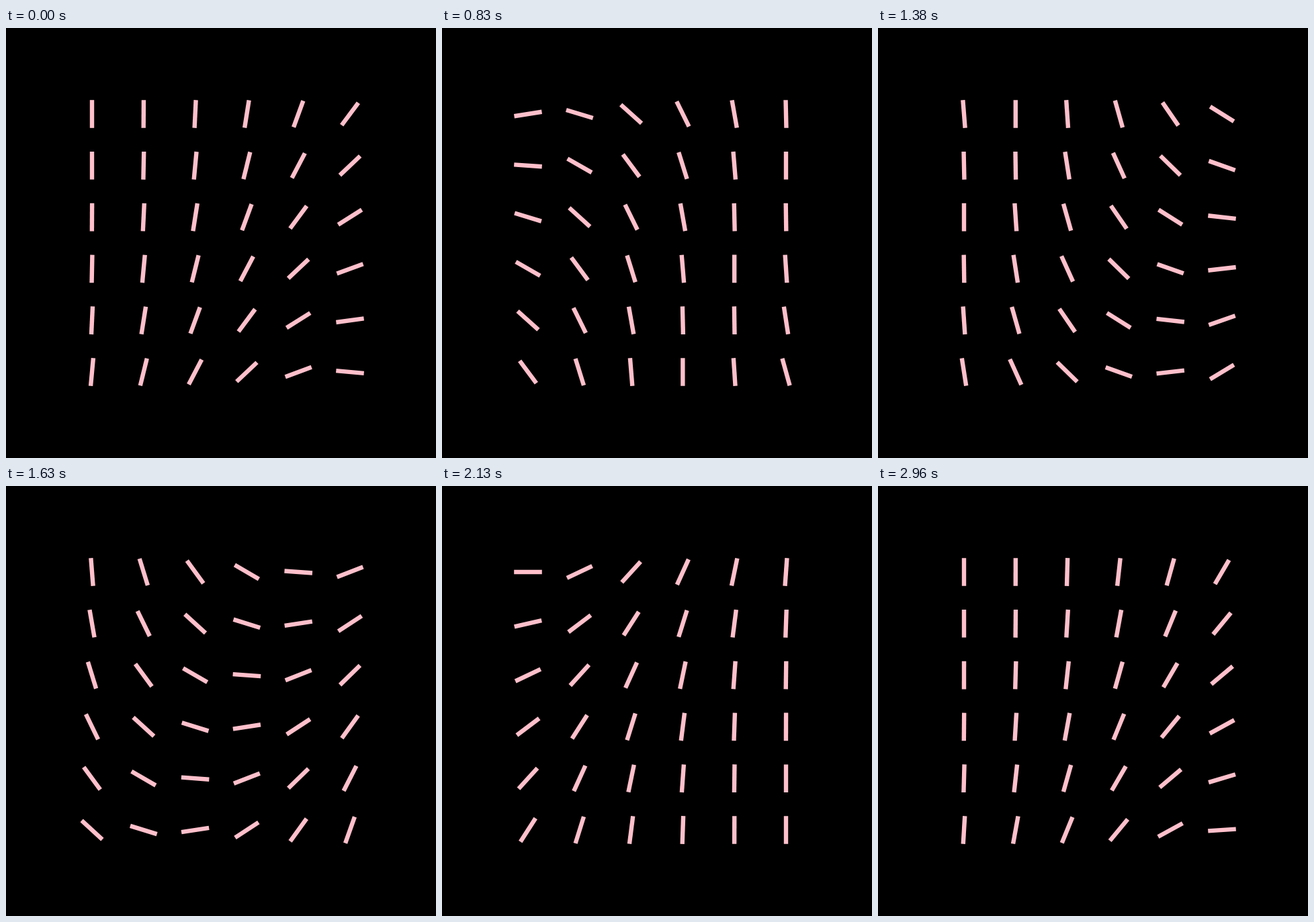
An HTML page with a canvas that plays this animation: 640 by 640 pixels, repeating every 3000 ms.

```html
<!DOCTYPE html>
<html lang="en">
<head>
<meta charset="utf-8">
<title>Turning bars</title>
<style>
  html, body { margin: 0; width: 100%; height: 100%; overflow: hidden; background: #000; }
  canvas { display: block; width: 100%; height: 100%; }
</style>
</head>
<body>
<canvas id="stage" width="640" height="640"></canvas>
<script>
const ctx = document.getElementById('stage').getContext('2d');
const LOOP = 3000, STEPS = 72;
const COUNT = 6, FIRST = 128, GAP = 76.8;
const LENGTH = 41.6, WIDTH = 6.4;

// Step starts fall on whole hundredths of a second.
function stepAt(ms) {
  const ticks = Math.floor((ms % LOOP) / 10);
  return Math.ceil((ticks + 0.5) * STEPS * 10 / LOOP) - 1;
}

// Half a turn clockwise and back again over one loop.
function angleAt(phase) {
  return Math.PI * Math.abs(Math.sin(Math.PI * phase)) ** 3;
}

function drawBar(x, y, angle) {
  ctx.save();
  ctx.translate(x, y);
  ctx.rotate(angle);
  ctx.fillRect(-WIDTH / 2, -LENGTH / 2, WIDTH, LENGTH);
  ctx.restore();
}

function draw(step) {
  ctx.fillStyle = '#000';
  ctx.fillRect(0, 0, 640, 640);
  ctx.fillStyle = 'pink';
  for (let row = 0; row < COUNT; row++) {
    for (let col = 0; col < COUNT; col++) {
      const lead = 0.02 * (2 * col + row);
      drawBar(FIRST + col * GAP, FIRST + row * GAP, angleAt(step / STEPS + lead));
    }
  }
}

const start = performance.now();
let shown = -1;

function tick() {
  const step = stepAt(performance.now() - start);
  if (step !== shown) draw(shown = step);
  requestAnimationFrame(tick);
}
tick();
</script>
</body>
</html>
```
